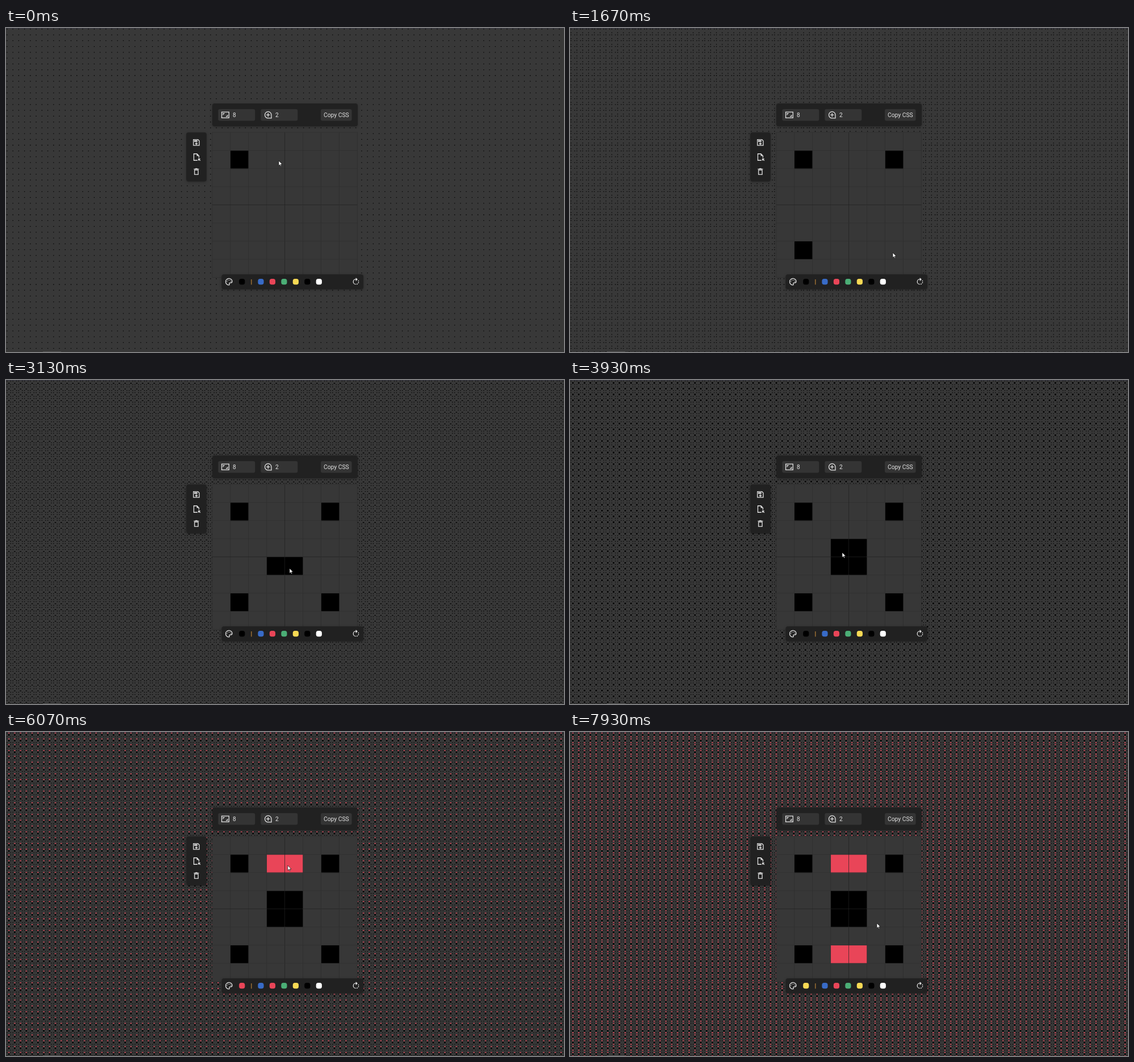
An HTML page with a canvas for the animation above (8 s loop, 982 by 571 pixels).

```html
<!DOCTYPE html>
<html lang="en">
<head>
<meta charset="utf-8">
<title>Pixel pattern editor</title>
<style>
  html, body { margin: 0; width: 100%; height: 100%; overflow: hidden; background: #383838; }
  canvas, svg { position: absolute; left: 0; top: 0; }
  text { font: 10.3px Roboto, sans-serif; fill: #e2e2e2; }
  .panel { fill: #212121; filter: drop-shadow(0 1px 2px rgba(0, 0, 0, .25)); }
  .field { fill: #343434; }
  #icons { fill: none; stroke: #e4e4e4; stroke-width: 2; }
</style>
</head>
<body>
<canvas id="canvas" width="982" height="571"></canvas>
<svg width="982" height="571" viewBox="0 0 982 571">
  <g id="grid" stroke-width=".7"></g>

  <rect class="panel" x="363" y="133" width="256" height="40.3" rx="4"/>
  <rect class="field" x="373.3" y="143" width="65" height="20.5" rx="3"/>
  <rect class="field" x="448.3" y="143" width="65" height="20.5" rx="3"/>
  <rect class="field" x="554" y="143" width="54.5" height="20.5" rx="3"/>
  <text x="399" y="156.8">8</text>
  <text x="474" y="156.8">2</text>
  <text x="581.3" y="156.8" text-anchor="middle">Copy CSS</text>

  <rect class="panel" x="317.2" y="184" width="35.8" height="86.5" rx="4"/>
  <rect class="panel" x="379.5" y="434.3" width="249.5" height="26.2" rx="4"/>
  <rect x="431.4" y="443" width="1" height="9.3" fill="#d6963c"/>
  <g id="icons"></g>
  <g id="swatches"></g>

  <path d="M0 .5H982" stroke="#3b3b45"/>
  <path d="M65 570.5H97" stroke="#555"/>
  <path id="cursor" d="M0 0V17L4 13.3L6.6 19.2L9.2 18L6.6 12.3H12.2Z" fill="#fff" stroke="#000" stroke-width="1.2"/>
</svg>
<script>
const LOOP = 8000, STEP = 200 / 3;   // the picture advances 15 times a second
const SCALE = 982 / 1536;            // layout pixels to stage pixels
const CELL = 50 * SCALE, DOT = 2 * SCALE, TILE = 8 * DOT, SIZE = 8 * CELL;
const BOARD = { x: 363.1, y: 184.2 };
const BLACK = '#000', RED = '#e94558', YELLOW = '#f7d954';

const palette = ['#386bc7', RED, '#4bae76', YELLOW, BLACK, '#fff'];
const swatchX = i => 448.5 + 32 * SCALE * i;
const swatchY = 447.2;

// Pointer legs: leave time, arrival time, end point, button.
// A click presses on leaving; a drag holds the button for the whole leg.
const legs = [
  [0, 400, 568, 235],
  [467, 1000, 410, 390, 'click'],
  [1067, 1667, 568, 396, 'click'],
  [1800, 2200, 464, 448, 'click'],
  [2400, 2667, 479, 331],
  [2980, 3133, 499, 332, 'drag'],
  [3200, 3400, 506, 300, 'drag'],
  [3400, 3667, 479, 304, 'drag'],
  [4200, 5000, 468, 446],
  [5100, 5600, 511, 260, 'click'],
  [5600, 5867, 480, 234],
  [5980, 6133, 506, 236, 'drag'],
  [6200, 6600, 472, 388],
  [6720, 6933, 510, 393, 'drag'],
  [7067, 7333, 510, 449],
  [7440, 7933, 540, 337, 'click']
];

// Centre and outline on a 24 unit grid.
const icons = [
  [386, 153.2, 'M2 4H22V20H2zM6 12V8H10M18 12V16H14'],
  [461.3, 153.2, 'M12 3a9 9 0 0 0 0 18h9v-9a9 9 0 0 0-9-9zM12 7v10M7 12h10'],
  [335, 201.8, 'M4 4H16.5L20 7.5V20H4zM6 7h9M6 9h9M12 13a2 2 0 1 0 .1 0z'],
  [335, 227.5, 'M15 21H5V3h8.5L19 8.5V14M14 3v5h5M18 21.7V17h4.7M18 17l5 5'],
  [335, 253, 'M5 5h14M9 4h6M7 8H17V20H7z'],
  [392.3, 447.2, 'M12 3a9 9 0 0 0 0 18c2 0 2-1.5 1.3-2.5-1-1.5 0-3.5 1.7-3.5h2a4 4 0 0 0 4-4c0-4.5-4-8-9-8zM5.5 11.5h2M8.5 7.5h2M13.5 7.5h2M16.5 11.5h2'],
  [616.3, 447.2, 'M11 5a7 7 0 0 0 0 14M13 19l3-1.2M17.7 16l1.2-3M18.9 11l-1.2-3M12 3v5l2.5-2.5z']
];

const $ = id => document.getElementById(id);
const ctx = $('canvas').getContext('2d');

function buildInterface() {
  for (let i = 0; i <= 8; i++) {
    const at = i * CELL - .4;
    const d = `M${BOARD.x + at} ${BOARD.y}v${SIZE}M${BOARD.x} ${BOARD.y + at}h${SIZE}`;
    $('grid').innerHTML += `<path d="${d}" stroke="${i === 4 ? '#222' : '#2e2e2e'}"/>`;
  }
  $('icons').innerHTML = icons.map(([x, y, d]) =>
    `<path transform="translate(${x} ${y}) scale(${SCALE}) translate(-12 -12)" d="${d}"/>`).join('');
  const side = 16 * SCALE;
  const swatch = (x, color) =>
    `<rect x="${x - side / 2}" y="${swatchY - side / 2}" width="${side}" height="${side}" rx="3.8" fill="${color}"/>`;
  $('swatches').innerHTML = swatch(415.3, BLACK) + palette.map((color, i) => swatch(swatchX(i), color)).join('');
}

// Replays the gestures and returns the state at every step of the loop.
function recordStates() {
  const states = [];
  let color = BLACK, cells = [{ col: 1, row: 1, color }];

  function press(x, y) {
    const picked = palette.find((_, i) => Math.hypot(x - swatchX(i), y - swatchY) < 6);
    if (picked) return void (color = picked);
    const col = Math.floor((x - BOARD.x) / CELL), row = Math.floor((y - BOARD.y) / CELL);
    if (!cells.some(cell => cell.col === col && cell.row === row)) {
      cells = [...cells, { col, row, color }];
    }
  }

  for (let t = 1; t < LOOP; t += STEP) {
    const index = legs.findLastIndex(leg => leg[0] <= t);
    const [leave, arrive, x1, y1, button] = legs[index];
    const [, , x0, y0] = legs[index - 1] || [0, 0, 480, 234];
    const k = Math.min(1, (t - leave) / (arrive - leave)), ease = k * k * (3 - 2 * k);
    const x = x0 + (x1 - x0) * ease, y = y0 + (y1 - y0) * ease;
    if (button === 'drag' || button === 'click' && t - leave < STEP) press(x, y);
    states.push({ x, y, color, cells });
  }
  return states;
}

function drawPattern(cells) {
  ctx.fillStyle = '#383838';
  ctx.fillRect(0, 0, 982, 571);
  for (const color of [BLACK, RED]) {
    ctx.beginPath();
    for (const cell of cells.filter(c => c.color === color)) {
      for (let y = cell.row * DOT; y < 571; y += TILE)
        for (let x = cell.col * DOT; x < 982; x += TILE) ctx.rect(x, y, DOT, DOT);
    }
    ctx.fillStyle = color;
    ctx.fill();
  }
  ctx.fillStyle = '#373737';
  ctx.fillRect(BOARD.x, BOARD.y, SIZE, SIZE);
  for (const { col, row, color } of cells) {
    ctx.fillStyle = color;
    ctx.fillRect(BOARD.x + col * CELL, BOARD.y + row * CELL, CELL, CELL);
  }
}

buildInterface();
const states = recordStates();
const start = performance.now();
let drawn;

(function tick() {
  const t = (performance.now() - start) % LOOP;
  const { x, y, color, cells } = states[Math.floor((t + 3) / STEP) % states.length];
  if (cells !== drawn) drawPattern(drawn = cells);
  $('swatches').firstChild.setAttribute('fill', color);
  $('cursor').setAttribute('transform', `translate(${x} ${y}) scale(.51)`);
  requestAnimationFrame(tick);
})();
</script>
</body>
</html>
```
